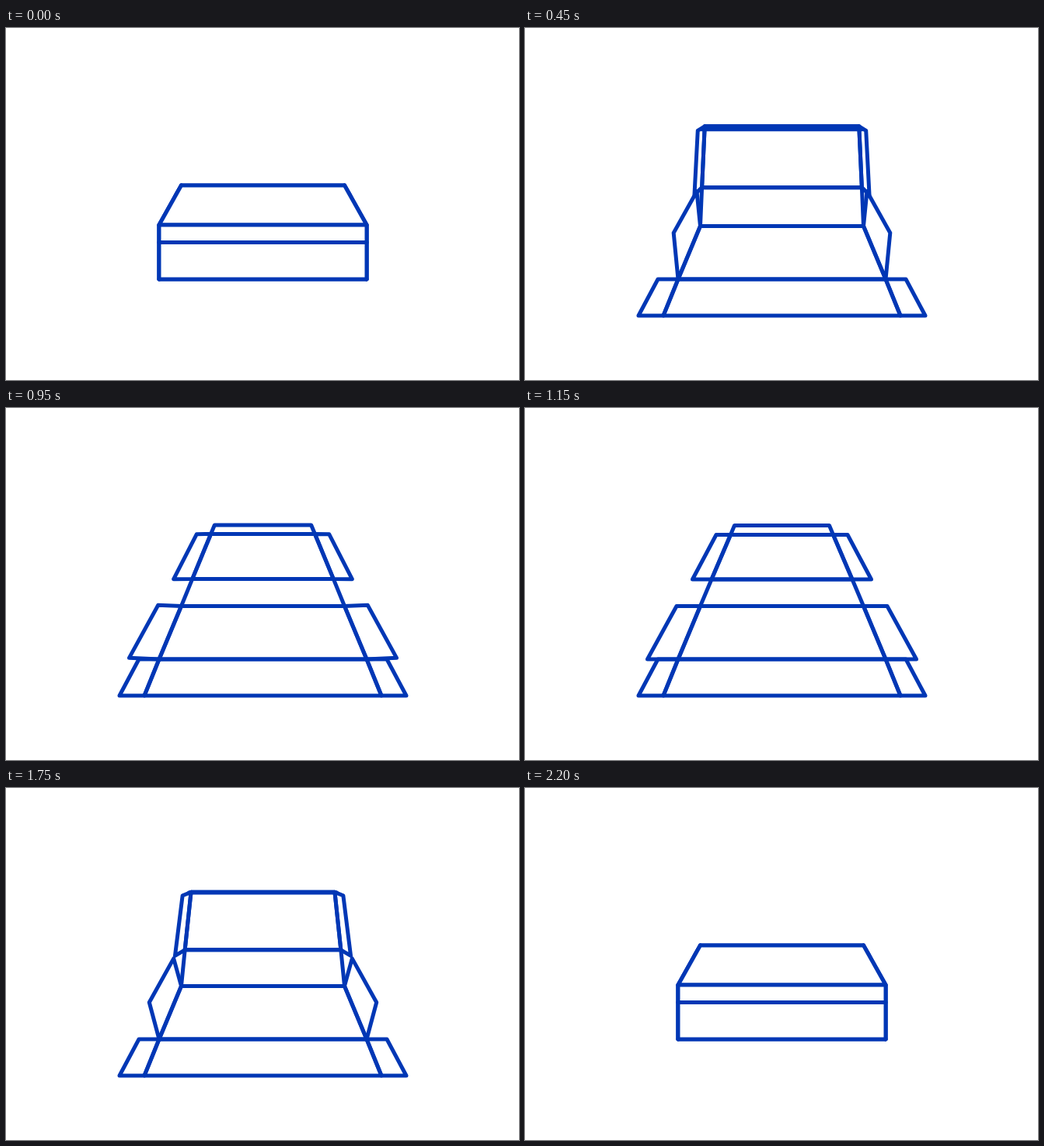
These frames come from a looping animation (660 by 454 pixels, 2.95 s). An HTML page:

```html
<!DOCTYPE html>
<html lang="en">
<head>
<meta charset="utf-8">
<title>Folding box</title>
<style>
  html, body { margin: 0; width: 100%; height: 100%; overflow: hidden; background: #fff; }
  svg { display: block; width: 660px; height: 454px; }
  path { stroke: #0037b5; stroke-width: 5; stroke-linejoin: round; stroke-linecap: round; }
</style>
</head>
<body>
<svg id="stage" viewBox="0 0 660 454"></svg>
<script>
const LOOP = 2950;
const AXIS = 330.5;

// Left-hand corners as [closed, upright, flat]; the right half is mirrored.
const fixed = (x, y) => [[x, y], [x, y], [x, y]];
const corners = {
  floorBack: fixed(225.5, 255.5),
  floorFront: fixed(197, 324),
  backTop: [[225.5, 203], [225.5, 203], [240, 221]],
  sideBack: [[225.5, 203], [225.5, 203], [195, 255.5]],
  sideFront: [[197, 254], [197, 254], [157.5, 324]],
  frontEdge: [[197, 276.5], [178, 371], [178, 371]],
  frontEarOuter: [[211, 251], [146, 371], [146, 371]],
  frontEarInner: [[211, 291], [171, 324], [171, 324]],
  lidEdge: [[197, 254], [225.5, 120.5], [264.5, 163.5]],
  tuckEdge: [[197, 276.5], [219.5, 127.2], [269.5, 151.5]],
  lidEarBack: [[218, 216], [218.4, 214.2], [215.5, 221]],
  lidEarFront: [[197, 276.5], [218.2, 127], [246, 163.5]]
};

// Back to front. A panel turns opaque once its outside faces the viewer.
const panels = [
  { pts: ['floorFront', 'floorBack'] },
  { pts: ['floorBack', 'backTop'] },
  { pts: ['floorFront', 'sideFront', 'sideBack', 'floorBack'], pair: true },
  { pts: ['frontEdge', 'frontEarOuter', 'frontEarInner', 'floorFront'], pair: true },
  { pts: ['floorFront', 'frontEdge'], opaqueFrom: 0.5 },
  { pts: ['backTop', 'lidEarBack', 'lidEarFront', 'lidEdge'], pair: true },
  { pts: ['backTop', 'lidEdge'], opaqueFrom: 0.62 },
  { pts: ['lidEdge', 'tuckEdge'], opaqueFrom: 0.62 }
];

const stage = document.getElementById('stage');
for (const panel of panels) {
  panel.node = document.createElementNS(stage.namespaceURI, 'path');
  stage.append(panel.node);
}

const mix = (a, b, k) => a.map((v, i) => v + (b[i] - v) * k);
const mirror = ([x, y]) => [2 * AXIS - x, y];
const outline = pts => 'M' + pts.map(p => p.map(v => v.toFixed(2)).join()).join('L') + 'Z';

function bezier(x1, y1, x2, y2) {
  const curve = (a, b, s) => 3 * (1 - s) ** 2 * s * a + 3 * (1 - s) * s * s * b + s ** 3;
  return x => {
    let lo = 0, hi = 1;
    for (let i = 0; i < 24; i++) {
      const mid = (lo + hi) / 2;
      if (curve(x1, x2, mid) < x) lo = mid; else hi = mid;
    }
    return curve(y1, y2, lo);
  };
}
const settle = bezier(0.167, 0.167, 0, 1);
const depart = bezier(0.167, 0, 0.833, 0.833);
const span = (t, from, to) => Math.min(1, Math.max(0, (t - from) / (to - from)));

function draw(t) {
  const closed = t < 1000 ? 1 - span(t, 0, 250) : span(t, 1850, 2200);
  const flat = t < 1300 ? settle(span(t, 400, 1150)) : 1 - depart(span(t, 1500, 1850));

  const place = name => {
    const [shut, upright, open] = corners[name];
    return closed > 0 ? mix(upright, shut, closed) : mix(upright, open, flat);
  };

  for (const { node, pts, pair, opaqueFrom } of panels) {
    const left = pts.map(place);
    const right = left.map(mirror);
    node.setAttribute('d', pair
      ? outline(left) + outline(right)
      : outline([...left, ...right.reverse()]));
    node.setAttribute('fill', closed > opaqueFrom ? '#fff' : 'none');
  }
}

const start = performance.now();
function tick() {
  // The motion advances in twentieths of a second.
  const t = (performance.now() - start) % LOOP;
  draw(Math.floor(t / 50) * 50);
  requestAnimationFrame(tick);
}
tick();
</script>
</body>
</html>
```
